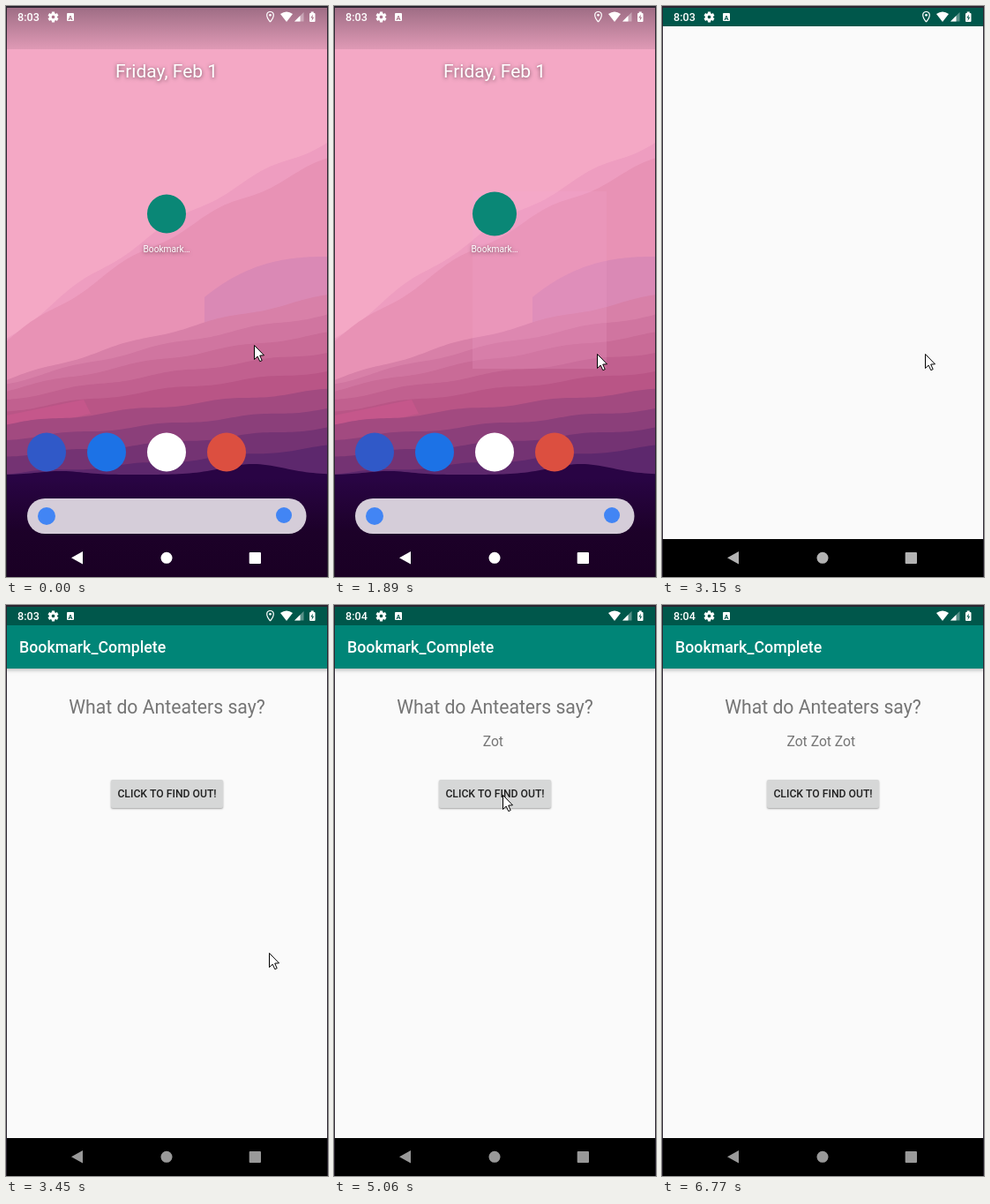
Animation, 365 px wide and 647 px high, one loop 7.76 s. Source, as an HTML page with a canvas:

```html
<!DOCTYPE html>
<html lang="en">
<head>
<meta charset="utf-8">
<title>Bookmark_Complete</title>
<style>
html, body { margin: 0; width: 100%; height: 100%; overflow: hidden; background: #222; }
canvas { display: block; }
</style>
</head>
<body>
<canvas id="stage" width="365" height="647"></canvas>
<script>
const W = 365, H = 647, LOOP = 7760;
const OPEN = 2010, HIDE_POINTER = 6770;
const CLICKS = [5060, 5450, 5870];
const ctx = document.getElementById('stage').getContext('2d');

const START = { x: 281, y: 384 };
const MOVES = [
  { from: 400, to: 790, n: 4, x: 172, y: 231 },
  { from: 1620, to: 1890, n: 3, x: 298, y: 394 },
  { from: 4000, to: 4520, n: 5, x: 215, y: 217 },
  { from: 4660, to: 4910, n: 3, x: 191, y: 215 },
  { from: 6260, to: 6650, n: 4, x: 283, y: 590 }
];

const mix = (a, b, k) => a + (b - a) * k;

// Progress in n equal jumps: 1/n at the first moment, 1 at the last.
function steps(t, first, last, n) {
  const done = Math.floor((t - first) / (last - first) * (n - 1) + 1.001);
  return Math.max(0, Math.min(n, done)) / n;
}

function pointerAt(t) {
  let { x, y } = START;
  for (const m of MOVES) {
    const k = steps(t, m.from, m.to, m.n);
    x = mix(x, m.x, k);
    y = mix(y, m.y, k);
  }
  return [Math.round(x), Math.round(y)];
}

function rect(color, x, y, w, h, r = 0) {
  ctx.fillStyle = color;
  ctx.beginPath();
  ctx.roundRect(x, y, w, h, r);
  ctx.fill();
}

function disc(color, x, y, r) {
  ctx.fillStyle = color;
  ctx.beginPath();
  ctx.arc(x, y, r, 0, Math.PI * 2);
  ctx.fill();
}

function poly(color, ...p) {
  ctx.fillStyle = color;
  ctx.beginPath();
  for (let i = 0; i < p.length; i += 2) ctx.lineTo(p[i], p[i + 1]);
  ctx.closePath();
  ctx.fill();
}

function text(str, x, y, size, color, weight = 400, align = 'left') {
  ctx.font = `${weight} ${size}px Roboto, sans-serif`;
  ctx.textAlign = align;
  ctx.fillStyle = color;
  ctx.fillText(str, x, y);
}

function shadow(color, blur, dy) {
  ctx.shadowColor = color;
  ctx.shadowBlur = blur;
  ctx.shadowOffsetY = dy;
}

// Fills everything below the curve y = height(x).
function land(color, height, x0 = 0) {
  ctx.fillStyle = color;
  ctx.beginPath();
  ctx.moveTo(x0, H);
  for (let x = x0; x <= W; x += 4) ctx.lineTo(x, height(x));
  ctx.lineTo(W, height(W));
  ctx.lineTo(W, H);
  ctx.fill();
}

// A slope from the left height to the right one, bowed in the middle.
function slope(color, left, right, bow, wobble = 1.5) {
  land(color, x => mix(left, right, x / W) + bow * Math.sin(Math.PI * x / W)
    + wobble * Math.sin(x / 17 + left));
}

const hump = (x, mid, width) => Math.exp(-(((x - mid) / width) ** 2));

function strataColor(k) {
  const top = [216, 128, 168], mid = [185, 85, 134], low = [93, 40, 109];
  const c = k < 0.5 ? top.map((v, i) => mix(v, mid[i], k * 2))
    : mid.map((v, i) => mix(v, low[i], k * 2 - 1));
  return `rgb(${c.join()})`;
}

function wallpaper() {
  rect('#f4a8c5', 0, 0, W, H);
  slope('#ee9dc0', 377, 153, -16, 3);
  slope('#e892b5', 380, 174, -14, 3);
  land('#da89b5', x => 284 + 46 * ((W - x) / 140) ** 2.5, 225);

  const layers = 8;
  for (let i = 0; i <= layers; i++) {
    const k = i / layers;
    slope(strataColor(k), 424 + 106 * k ** 1.6, 328 + 171 * k, mix(-6, 2, k));
    if (i === 4) poly('#c5578b', 0, 464, 88, 446, 96, 462, 0, 484);
  }

  land('#290444', x => 531 - 12 * hump(x, 280, 50) - 4 * hump(x, 62, 35));
  const fade = ctx.createLinearGradient(0, 535, 0, H);
  fade.addColorStop(0, 'rgba(26,0,36,0)');
  fade.addColorStop(0.55, 'rgba(26,0,36,.85)');
  fade.addColorStop(1, 'rgba(26,0,36,1)');
  rect(fade, 0, 535, W, H - 535);
}

function topShade() {
  const shade = ctx.createLinearGradient(0, 2, 0, 49);
  shade.addColorStop(0, 'rgba(55,38,55,.45)');
  shade.addColorStop(1, 'rgba(55,38,55,.11)');
  rect(shade, 0, 0, W, 49);
}

function home(t) {
  wallpaper();
  if (t < OPEN) topShade();
  if (t >= 1890) rect('rgba(245,165,207,.18)', 157, 210, 152, 201);

  shadow('rgba(0,0,0,.55)', 4, 1);
  text('Friday, Feb 1', 182, 81, 21, '#fff', 400, 'center');
  text('Bookmark…', 182, 279, 10.2, '#fff', 400, 'center');
  shadow('transparent', 0, 0);

  disc('#0a8776', 182, 235.5, 22 + 3 * steps(t, 1320, 1890, 3));
  ['#3059c8', '#1c72e6', '#fff', '#dc4f40'].forEach((c, i) => disc(c, 46 + 68 * i, 505.5, 22));

  rect('#d5cdd9', 24, 558, 316.5, 40, 20);
  disc('#4285f4', 46, 578, 10);
  disc('#4285f4', 315, 577, 9);
}

function gear(x, y) {
  for (let i = 0; i < 6; i++) {
    ctx.save();
    ctx.translate(x, y);
    ctx.rotate(i * Math.PI / 3);
    rect('#fff', -1.6, -6, 3.2, 4);
    ctx.restore();
  }
  ctx.strokeStyle = '#fff';
  ctx.lineWidth = 2.6;
  ctx.beginPath();
  ctx.arc(x, y, 3.3, 0, Math.PI * 2);
  ctx.stroke();
}

function pin(x, y) {
  ctx.strokeStyle = '#fff';
  ctx.lineWidth = 1.2;
  ctx.beginPath();
  ctx.moveTo(x, y + 6);
  ctx.bezierCurveTo(x - 6, y - 1, x - 4, y - 5.5, x, y - 5.5);
  ctx.bezierCurveTo(x + 4, y - 5.5, x + 6, y - 1, x, y + 6);
  ctx.stroke();
  disc('#fff', x, y - 1.7, 1.4);
}

function wifi(x, y) {
  ctx.fillStyle = '#fff';
  ctx.beginPath();
  ctx.moveTo(x, y);
  ctx.lineTo(x - 7, y - 9);
  ctx.quadraticCurveTo(x, y - 14, x + 7, y - 9);
  ctx.fill();
}

function signal(x, y) {
  const wedge = (color, s) => poly(color, x, y, x + s, y - s, x + s, y);
  wedge('rgba(255,255,255,.35)', 10.5);
  wedge('#fff', 6.5);
}

function battery(x, y, ground) {
  rect('#fff', x, y, 6.5, 10, 1);
  rect('#fff', x + 1.7, y - 1.5, 3, 2);
  poly(ground, x + 4, y + 1.5, x + 1.3, y + 5.5, x + 3.2, y + 5.5);
  poly(ground, x + 2.5, y + 9, x + 5.2, y + 4.8, x + 3.3, y + 4.8);
}

function statusIcons(t, ground) {
  text(t < 4910 ? '8:03' : '8:04', 13, 17, 12.6, '#fff', 500);
  gear(53.5, 12.5);
  rect('#fff', 69, 8, 8, 9, 1);
  text('A', 73, 15.5, 7.5, ground, 700, 'center');
  if (t < 3730) pin(299.5, 12);
  wifi(318, 18);
  signal(327, 17.5);
  battery(344, 8, ground);
}

function navIcons(t) {
  const tone = Math.round(mix(255, 153, steps(t, 2720, 3300, 4)));
  const c = `rgb(${tone},${tone},${tone})`;
  poly(c, 74, 625.3, 87, 618, 87, 632.6);
  disc(c, 182, 625.3, 6.5);
  rect(c, 275.7, 619, 13.3, 13, 1);
}

function button(t) {
  const next = CLICKS.find(c => t < c);
  const p = next ? steps(t, next - 280, next - 150, 2) : 0;
  const tone = Math.round(mix(214, 186, p));
  shadow('rgba(0,0,0,.35)', 2 + 5 * p, 1 + p);
  rect(`rgb(${tone},${tone + 1},${tone + 1})`, 119, 198, 127, 32, 2);
  shadow('transparent', 0, 0);
  text('CLICK TO FIND OUT!', 182.5, 218, 12.2, '#212121', 500, 'center');
}

function content(t) {
  ctx.globalAlpha = steps(t, 3300, 3450, 2);
  shadow('rgba(0,0,0,.25)', 4, 2);
  rect('#008577', 0, 23, W, 49);
  shadow('transparent', 0, 0);
  rect('#00574b', 0, 2, W, 21);
  text('Bookmark_Complete', 15, 54, 17.8, '#fff', 500);
  text('What do Anteaters say?', 182.5, 123, 21.2, '#757575', 400, 'center');
  const said = CLICKS.filter(c => t >= c).map(() => 'Zot').join(' ');
  text(said, 180.3, 160, 15.7, '#757575', 400, 'center');
  button(t);
  ctx.globalAlpha = 1;
}

function appWindow(t) {
  const gap = 1 - steps(t, OPEN, 2290, 3);
  const inset = (edge, by) => Math.round(edge + by * gap);
  const left = inset(0, 4), right = inset(W, -6);
  const band = (color, top, bottom) => rect(color, left, top, right - left, bottom - top);
  const top = inset(2, 10.5), bar = inset(23, 6), nav = inset(604, -4.5);
  band('#00574b', top, bar);
  band('#fafafa', bar, nav);
  band('#000', nav, inset(H, -11));
}

function arrow(x, y) {
  ctx.save();
  ctx.translate(x + 0.5, y + 0.5);
  poly('#fff', 0, 0, 0, 16, 3.7, 12.6, 6.3, 18.2, 8.7, 17.1, 6.2, 11.6, 11, 11.3);
  ctx.strokeStyle = '#000';
  ctx.lineWidth = 1;
  ctx.stroke();
  ctx.restore();
}

function frame(t) {
  const opened = t >= OPEN;
  if (t < 2290) home(t);
  if (opened) {
    appWindow(t);
    content(t);
  }
  statusIcons(t, opened ? '#00574b' : '#a97388');
  navIcons(t);

  const edge = '#2b2530';
  rect(edge, 0, 0, W, 2);
  rect(edge, 0, 0, 1, H);
  rect(edge, W - 1, 0, 1, H);
  if (t < HIDE_POINTER) arrow(...pointerAt(t));
}

const start = performance.now();
function tick() {
  frame((performance.now() - start) % LOOP);
  requestAnimationFrame(tick);
}
tick();
</script>
</body>
</html>
```
